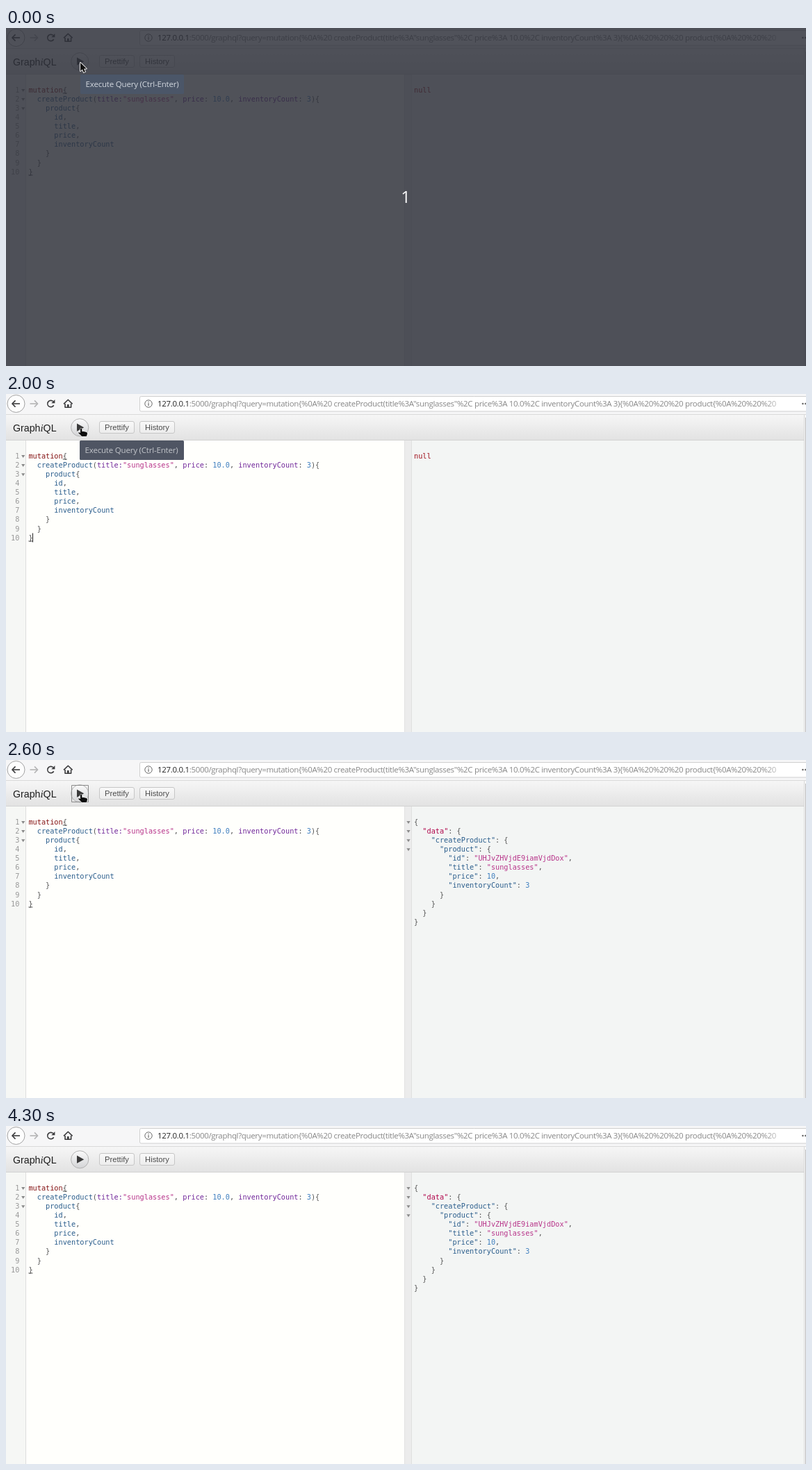
Recreate the animation shown at these times as an HTML page with a canvas. Size 1151 by 487 pixels, loop 4400 ms.

```html
<!DOCTYPE html>
<html lang="en">
<head>
<meta charset="utf-8">
<title>GraphiQL mutation</title>
<style>
html, body { margin: 0; width: 100%; height: 100%; overflow: hidden; background: #fff; }
canvas { display: block; }
</style>
</head>
<body>
<canvas id="stage" width="1151" height="487"></canvas>
<script>
const c = document.getElementById('stage').getContext('2d');
const W = 1151, H = 487, LOOP = 4400;
const UI = '"Open Sans", "Noto Sans", sans-serif';
const ARIAL = '"Liberation Sans", Arial, sans-serif';
const MONO = '"DejaVu Sans Mono", monospace';
const CODE = '10.24px ' + MONO;
const COL = 6.16, LINE = 13.12, BASE = 92.6;
const INK = {
  k: '#861616', n: '#a0101c', d: '#b0054a', f: '#2a5d8c', a: '#71279a',
  s: '#b8358a', i: '#3f7fbf', p: '#555555', g: '#999999'
};

// Each token: ink letter, then its text.
const QUERY = [
  [0, 'kmutation', 'p{'],
  [2, 'fcreateProduct', 'p(', 'atitle:', 's"sunglasses"', 'p, ', 'aprice', 'p: ', 'i10.0',
    'p, ', 'ainventoryCount', 'p: ', 'i3', 'p){'],
  [4, 'fproduct', 'p{'],
  [6, 'fid', 'p,'],
  [6, 'ftitle', 'p,'],
  [6, 'fprice', 'p,'],
  [6, 'finventoryCount'],
  [4, 'p}'],
  [2, 'p}'],
  [0, 'p}']
];
const RESULT = [
  [0, 'p{'],
  [2, 'd"data"', 'p: {'],
  [4, 'f"createProduct"', 'p: {'],
  [6, 'f"product"', 'p: {'],
  [8, 'f"id"', 'p: ', 's"UHJvZHVjdE9iamVjdDox"', 'p,'],
  [8, 'f"title"', 'p: ', 's"sunglasses"', 'p,'],
  [8, 'f"price"', 'p: ', 'i10', 'p,'],
  [8, 'f"inventoryCount"', 'p: ', 'i3'],
  [6, 'p}'],
  [4, 'p}'],
  [2, 'p}'],
  [0, 'p}']
];
const HOST = '127.0.0.1';
const PATH = ':5000/graphql?query=mutation{%0A%20 createProduct(title%3A"sunglasses"%2C price%3A 10.0%2C ' +
  'inventoryCount%3A 3){%0A%20%20%20 product{%0A%20%20%20';

function rect(x, y, w, h, fill) {
  c.fillStyle = fill;
  c.fillRect(x, y, w, h);
}

function text(str, x, y, font, fill, spacing = 0, align = 'left') {
  c.font = font;
  c.fillStyle = fill;
  c.letterSpacing = spacing + 'px';
  c.textAlign = align;
  c.fillText(str, x, y);
  const width = c.measureText(str).width;
  c.letterSpacing = '0px';
  return width;
}

function shape(points, fill, stroke, width = 1) {
  c.beginPath();
  points.forEach(([x, y]) => c.lineTo(x, y));
  c.closePath();
  if (stroke) {
    c.strokeStyle = stroke;
    c.lineWidth = width;
    c.lineJoin = 'round';
    c.stroke();
  }
  c.fillStyle = fill;
  c.fill();
}

function line(points, stroke, width) {
  c.beginPath();
  points.forEach(([x, y]) => c.lineTo(x, y));
  c.strokeStyle = stroke;
  c.lineWidth = width;
  c.stroke();
}

function circle(x, y, r, fill, stroke, width = 1) {
  c.beginPath();
  c.arc(x, y, r, 0, Math.PI * 2);
  if (fill) { c.fillStyle = fill; c.fill(); }
  if (stroke) { c.strokeStyle = stroke; c.lineWidth = width; c.stroke(); }
}

function rounded(x, y, w, h, r, fill, stroke) {
  c.beginPath();
  c.roundRect(x, y, w, h, r);
  c.fillStyle = fill;
  c.fill();
  if (stroke) { c.strokeStyle = stroke; c.lineWidth = 1; c.stroke(); }
}

function vertical(y0, y1, top, bottom) {
  const g = c.createLinearGradient(0, y0, 0, y1);
  g.addColorStop(0, top);
  g.addColorStop(1, bottom);
  return g;
}

function code(lines, x0) {
  lines.forEach(([indent, ...tokens], row) => {
    let col = indent;
    for (const token of tokens) {
      const str = token.slice(1);
      text(str, x0 + col * COL, BASE + row * LINE, CODE, INK[token[0]]);
      col += str.length;
    }
  });
}

function foldMarks(x, rows) {
  for (let i = 0; i < rows; i++) {
    const y = 88 + i * LINE;
    shape([[x - 2.6, y], [x + 2.6, y], [x, y + 4]], '#8a8a8a');
  }
}

function arrowIcon(x, y, dir, ink) {
  line([[x - 5.5 * dir, y], [x + 5 * dir, y]], ink, 1.6);
  line([[x + dir, y - 4.6], [x + 5.6 * dir, y], [x + dir, y + 4.6]], ink, 1.6);
}

function browserBar(hover) {
  rect(0, 0, W, 30, '#f6f6f7');
  rect(0, 29, W, 1, '#d9d9d9');
  if (hover) rounded(hover - 10.5, 3, 21, 22, 2, '#d9d9da');

  circle(14.5, 14, 12.5, '#fdfdfd', '#a2a2a2');
  arrowIcon(14.5, 14, -1, '#3b3b3d');
  arrowIcon(40, 14, 1, '#b4b4b5');

  c.beginPath();
  c.arc(64.5, 14, 4.7, 0.5, Math.PI * 1.75);
  c.strokeStyle = '#3b3b3d';
  c.lineWidth = 1.7;
  c.stroke();
  shape([[70.4, 8], [70.4, 13.2], [65.2, 13.2]], '#3b3b3d');

  line([[83, 14.4], [89.3, 8.3], [95.6, 14.4]], '#3b3b3d', 1.6);
  line([[85, 14], [85, 19.2], [93.6, 19.2], [93.6, 14]], '#3b3b3d', 1.6);
  rect(88, 15, 2.6, 4.5, '#3b3b3d');

  rounded(192.5, 3.5, 980, 21.5, 2, '#ffffff', '#cfcfcf');
  circle(205, 14, 5.2, null, '#6d6d6d');
  rect(204.4, 13, 1.2, 4, '#6d6d6d');
  rect(204.4, 10.8, 1.2, 1.3, '#6d6d6d');

  c.save();
  c.beginPath();
  c.rect(215, 4, 902, 20);
  c.clip();
  const font = '11.5px ' + UI;
  const fade = c.createLinearGradient(1088, 0, 1122, 0);
  fade.addColorStop(0, '#868686');
  fade.addColorStop(1, '#e4e4e4');
  const w = text(HOST, 218, 18.2, font, '#222222', -0.33);
  text(PATH, 218 + w, 18.2, font, fade, -0.33);
  c.restore();
  circle(1146.4, 14, 1.3, '#666666');
  circle(1150.4, 14, 1.3, '#666666');
}

function button(label, x, w) {
  rounded(x + 0.5, 39.5, w - 1, 17, 2.5, vertical(39, 57, '#f9f9f9', '#ececec'), '#c6c6c6');
  text(label, x + w / 2, 51.6, '11.2px ' + ARIAL, '#4a4a4a', 0, 'center');
}

function toolbar(focused) {
  rect(0, 30, 1149, 37, vertical(30, 67, '#f6f6f6', '#e2e2e2'));
  rect(0, 66, 1149, 1, '#d2d2d2');
  const logo = '14.2px ' + ARIAL;
  let x = 10;
  x += text('Graph', x, 53.6, logo, '#1d1d1d');
  x += text('i', x, 53.6, 'italic 15px "Liberation Serif", serif', '#1d1d1d');
  text('QL', x, 53.6, logo, '#1d1d1d');

  circle(106.2, 48.3, 12.6, vertical(35, 61, '#fcfcfc', '#d3d4d6'), '#b2b2b2');
  shape([[102, 42.6], [112.2, 48.2], [102, 53.8]], '#3a3a3a');
  if (focused) {
    c.strokeStyle = '#8a8a8a';
    c.lineWidth = 1;
    c.strokeRect(94.5, 36.5, 24, 24);
  }
  button('Prettify', 134, 51);
  button('History', 192, 51);
}

function panes() {
  rect(0, 67, 573, 420, '#fffffc');
  rect(0, 67, 29, 420, '#f6f7f5');
  rect(28, 67, 1, 420, '#dddddd');
  rect(573, 67, 11, 420, '#ececec');
  rect(573, 67, 1, 420, '#e2e2e2');
  rect(583, 67, 1, 420, '#e0e0e0');
  rect(584, 67, 565, 420, '#f3f5f4');
  rect(1148, 30, 1, 457, '#d9d9d9');
  rect(1149, 30, 2, 457, '#f7f7f7');
  rect(1150, 34, 1, 453, '#b9b9bb');

  QUERY.forEach((_, i) => text(i + 1, 19.3, BASE + i * LINE, CODE, INK.g, 0, 'right'));
  foldMarks(24.7, 3);
  code(QUERY, 32.4);
  // Matching brackets
  rect(81.7, 93.5, 6, 1, '#555555');
  rect(32.4, 211.5, 6, 1, '#555555');
}

function tooltip(x, fill, ink) {
  rounded(x, 67, 256 - x, 28, 1.5, fill);
  text('Execute Query (Ctrl-Enter)', x + 7.6, 85, '11.5px ' + UI, ink, -0.19);
}

function spinner() {
  c.beginPath();
  c.arc(866, 391, 15.4, 1.28, 1.28 + Math.PI / 2);
  c.strokeStyle = '#a9aaaa';
  c.lineWidth = 4.7;
  c.stroke();
}

function pointer(x, y) {
  const outline = [[0, 0], [0, 12], [2.8, 9.5], [4.9, 14], [7, 13], [5, 8.8], [8.8, 8.6]];
  shape(outline.map(([dx, dy]) => [x + dx, y + dy]), '#111111', '#f4f4f4', 1.8);
}

function hand(x, y) {
  const outline = [
    [-1, 0], [0.6, 0], [1.3, 1], [1.3, 4], [3.6, 4], [6, 4.6], [8.2, 5.2], [9, 6.2],
    [8.7, 8.5], [7.7, 11], [1, 11], [-0.8, 9], [-3.6, 6.6], [-3.6, 5.4], [-2.4, 5.2], [-1, 6.2]
  ];
  shape(outline.map(([dx, dy]) => [x + dx, y + dy]), '#0c0c0c', '#f4f4f4', 1.1);
}

function countdown() {
  rect(0, 0, W, H, 'rgba(45, 48, 57, 0.83)');
  tooltip(107, '#4b5668', '#d3d8df');
  pointer(107, 50);
  text('1', W / 2 - 0.5, 252.4, '24px ' + UI, '#ffffff', 0, 'center');
}

function draw(t) {
  const within = (from, to) => t >= from && t < to;
  const hover = within(3600, 3700) ? 89.5 : within(3700, 3900) ? 64.5 : 0;
  rect(0, 0, W, H, '#ffffff');
  browserBar(hover);
  toolbar(within(2100, 4300));
  panes();

  if (t < 2100) {
    text('null', 587, BASE, CODE, INK.n);
  } else if (t < 2200) {
    spinner();
  } else {
    foldMarks(579, 4);
    code(RESULT, 587);
  }

  if (within(2000, 2100)) {
    rect(38, 200.5, 1, 13, '#222222');
    tooltip(106, '#4f5563', '#c3c6cb');
  }
  if (t < 400) countdown();
  else if (t < 3600) hand(t < 1500 ? 109 : 108, 50);
  else if (t < 3700) pointer(85, 31);
}

function frame() {
  draw(performance.now() % LOOP);
  requestAnimationFrame(frame);
}
frame();
</script>
</body>
</html>
```
